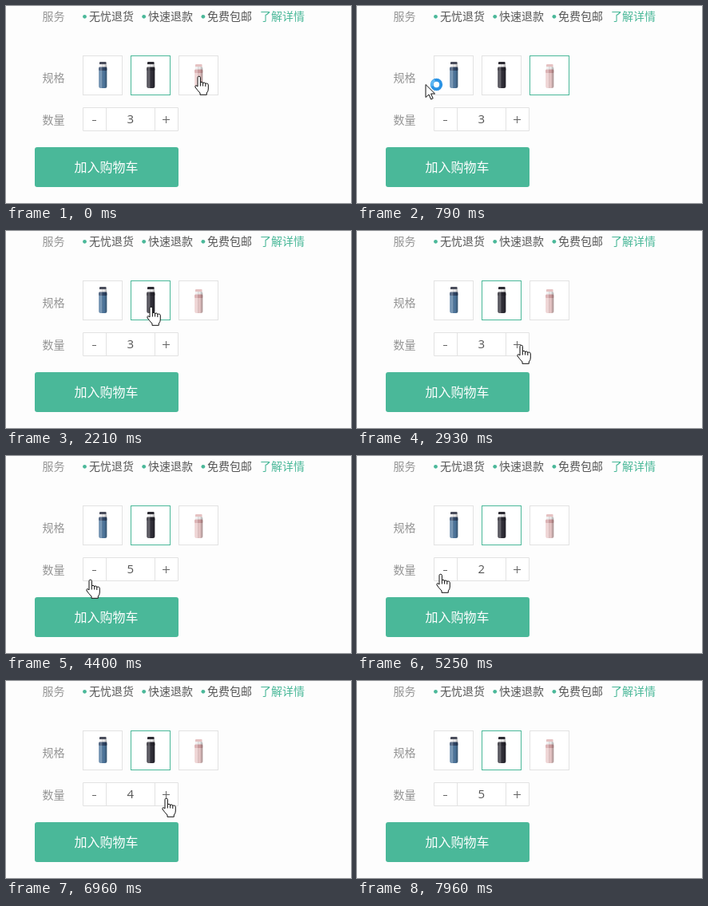
An HTML page for the animation above (9.1 s loop, 432 by 247 pixels).

```html
<!DOCTYPE html>
<html lang="zh-CN">
<head>
<meta charset="utf-8">
<title>选择规格</title>
<style>
html, body { margin: 0; width: 100%; height: 100%; overflow: hidden; background: #fdfdfd; }
svg { display: block; width: 100vw; height: 100vh; }
text { font: 14px "Noto Sans CJK SC", "Noto Sans CJK", sans-serif; fill: #555; }
.label { fill: #949494; }
.link { fill: #4ab899; }
.mid { font: 15px "Open Sans", sans-serif; text-anchor: middle; }
.buy { font-size: 16px; font-weight: 500; fill: #fff; }
.box { fill: #fff; stroke: #e2e2e2; }
.on { stroke: #4ab899; }
.ink { fill: #fff; stroke: #111; stroke-linejoin: round; }
</style>
</head>
<body>
<svg viewBox="0 0 432 247" preserveAspectRatio="none">
  <defs>
    <linearGradient id="shade">
      <stop offset="0" stop-color="#fff" stop-opacity=".1"/>
      <stop offset=".3" stop-color="#fff" stop-opacity=".3"/>
      <stop offset=".6" stop-color="#000" stop-opacity="0"/>
      <stop offset="1" stop-color="#000" stop-opacity=".3"/>
    </linearGradient>
  </defs>
  <rect width="432" height="247" fill="#fdfdfd"/>
  <text class="label" x="45.5" y="18">服务</text>
  <text class="label" x="45.5" y="95">规格</text>
  <text class="label" x="45.5" y="148">数量</text>
  <g id="perks"></g>
  <text class="link" x="318" y="18">了解详情</text>
  <g id="thumbs"></g>
  <path class="box" d="M96.5 127.5h119v29h-119zM125.5 127.5v29M186.5 127.5v29"/>
  <path d="M108 143.5h5M196 142.5h9M200.5 138v9" stroke="#666"/>
  <text class="mid" id="count" x="155.7" y="147">3</text>
  <rect x="36" y="177" width="180" height="50" rx="3" fill="#4ab899"/>
  <text class="buy" x="85.5" y="208">加入购物车</text>
  <g id="cursor">
    <path id="hand" class="ink" d="M-2 13V1.7Q-2 .2 -.3 .2T1.4 1.7V8.5Q1.4 7.3 3 7.3T4.6 9Q4.6 8 6.2 8T7.8 9.8Q7.8 9 9.4 9T11.3 10.8V16Q11.3 19 9.3 21V23.3H1V21Q-2 18 -4.9 14Q-5.7 12 -4.2 11.7Q-3 11.8 -2 13ZM4.6 9V12.5M7.8 9.8V13M1.4 8.5V12.5"/>
    <path id="arrow" class="ink" d="M0 .5V16.5L4 13L6.6 19L9.2 17.8L6.6 12H11.6Z"/>
    <path id="beam" d="M-3 -8H-1L0 -7L1 -8H3M0 -7V7M-3 8H-1L0 7L1 8H3" fill="none" stroke="#333"/>
    <g id="ring" fill="none">
      <circle cx="13.5" cy=".5" r="5.7" fill="#fff" stroke="#2b93e4" stroke-width="4"/>
      <path id="glint" d="M13.5 -5.2A5.7 5.7 0 0 1 19.2 .5" stroke="#5fb8f3" stroke-width="3"/>
    </g>
  </g>
</svg>
<script>
const LOOP = 9100, BEAT = 135, CLICK_GAP = 280, PITCH = 60;
const $ = id => document.getElementById(id);

$('perks').innerHTML = ['无忧退货', '快速退款', '免费包邮'].map((s, i) =>
  `<circle cx="${98.5 + 74.2 * i}" cy="13.3" r="2.4" fill="#4ab899"/>
   <text x="${104 + 74 * i}" y="18">${s}</text>`).join('');

function bottle(x, top, cap, neck, body) {
  const part = (dx, y, bottom, r, fill) =>
    `<rect x="${x + dx}" y="${y}" width="${10 - 2 * dx}" height="${bottom - y}" rx="${r}" fill="${fill}"/>`;
  return part(.7, top, top + 4, 1, cap) + part(.7, top + 3, top + 7, 0, '#eeedee') +
    part(0, top + 7, 103, 2.5, body) + part(0, top + 6.5, top + 11, 1, neck) +
    part(0, top + 3, 103, 2.5, 'url(#shade)');
}

const goods = [
  { top: 70, cap: '#4a4d5c', neck: '#2f4566', body: '#4f789f' },
  { top: 70, cap: '#2c2a32', neck: '#25232c', body: '#302e38' },
  { top: 73, cap: '#e6c2c2', neck: '#d3a0a2', body: '#ebcaca' }
];
$('thumbs').innerHTML = goods.map((g, i) =>
  `<rect class="box" x="${96.5 + PITCH * i}" y="62.5" width="49" height="49"/>` +
  bottle(116.3 + PITCH * i, g.top, g.cap, g.neck, g.body)).join('');
const boxes = [...$('thumbs').querySelectorAll('.box')];

const moves = [
  { from: 250, to: 790, x: 86, y: 98 },
  { from: 940, to: 1090, x: 121, y: 92 },
  { from: 1380, to: 1920, x: 182, y: 95, sag: 20 },
  { from: 2360, to: 2930, x: 206, y: 143 },
  { from: 4100, to: 4400, x: 106, y: 155 },
  { from: 4550, to: 4690, x: 105, y: 148 },
  { from: 6020, to: 6300, x: 188, y: 147 },
  { from: 6420, to: 6540, x: 201, y: 147 },
  { from: 7540, to: 7820, x: 405, y: 226 }
];
const picks = [{ t: 0, i: 1 }, { t: 120, i: 2 }, { t: 1240, i: 0 }, { t: 2210, i: 1 }];
const bursts = [
  { t: 3390, clicks: 2, by: 1 },
  { t: 4670, clicks: 4, by: -1 },
  { t: 6400, clicks: 4, by: 1 }
];

const clamp = (v, lo, hi) => Math.min(hi, Math.max(lo, v));
const ease = u => u * u * (3 - 2 * u);

const count = t => bursts.reduce((n, b) =>
  n + b.by * clamp(1 + Math.floor((t - b.t) / CLICK_GAP), 0, b.clicks), 3);

// The pointer advances in whole beats, as a screen recorder samples it
function place(t) {
  let x = 242, y = 88;
  for (const m of moves) {
    if (t < m.from) break;
    const last = Math.round((m.to - m.from) / BEAT);
    const u = clamp((t - m.from) / (m.to - m.from), 0, 1);
    const k = ease((Math.floor(u * last + 1e-6) + 1) / (last + 1));
    x += (m.x - x) * k;
    y += (m.y - y) * k + (m.sag || 0) * 4 * k * (1 - k);
  }
  return [Math.round(x), Math.round(y)];
}

function shape(x, y) {
  const inside = (l, t, r, b) => x >= l && x < r && y >= t && y < b;
  if (inside(126, 127, 186, 157)) return 'beam';
  const onThumb = inside(96, 62, 266, 112) && (x - 96) % PITCH < 50;
  return onThumb || inside(96, 127, 216, 158) || inside(36, 177, 216, 227) ? 'hand' : 'arrow';
}

const show = (id, yes) => $(id).setAttribute('visibility', yes ? 'visible' : 'hidden');

function draw(t) {
  const pick = picks.filter(p => p.t <= t).pop().i;
  boxes.forEach((b, i) => b.classList.toggle('on', i === pick));
  $('count').textContent = count(t);
  const [x, y] = place(t);
  const kind = t < 7960 ? shape(x, y) : '';
  $('cursor').setAttribute('transform', `translate(${x} ${y})`);
  for (const id of ['hand', 'arrow', 'beam']) show(id, id === kind);
  show('ring', kind === 'arrow' && t >= 250 && t < 1090);
  $('glint').setAttribute('transform', `rotate(${Math.floor(t / BEAT) * 50} 13.5 .5)`);
}

const born = performance.now();
function tick() {
  draw((performance.now() - born) % LOOP);
  requestAnimationFrame(tick);
}
tick();
</script>
</body>
</html>
```
